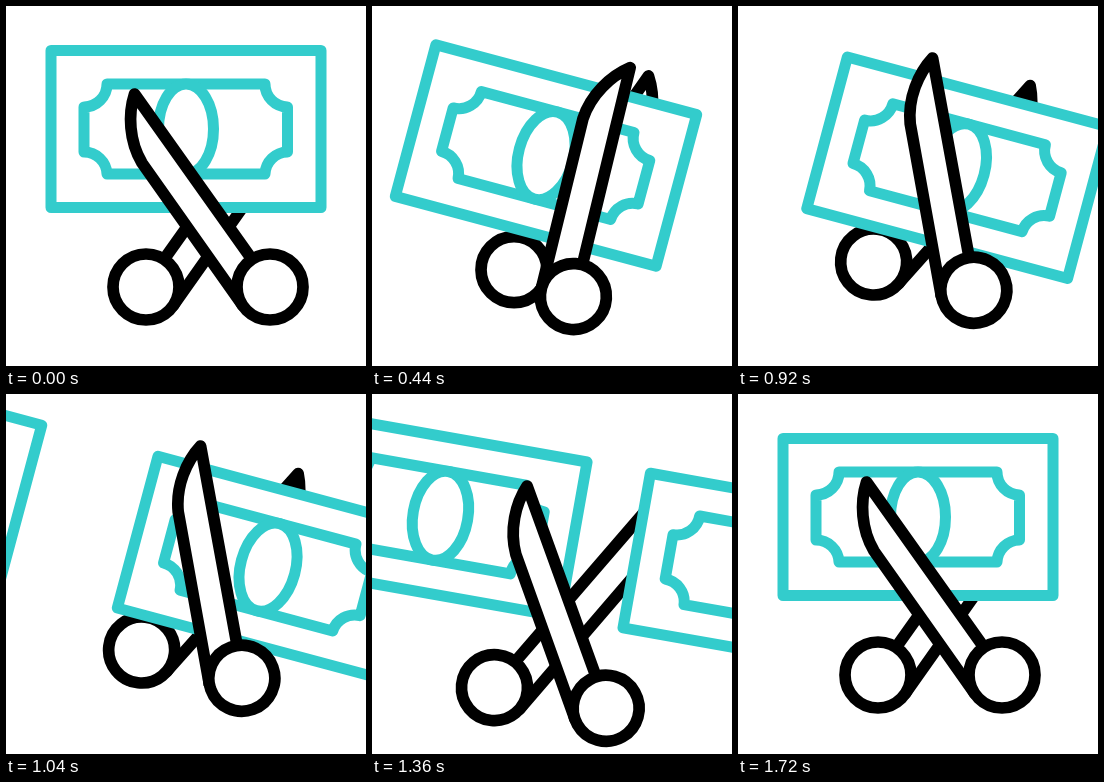
Animation of 360x360 px, one loop 2000 ms. Source, as an HTML page:

```html
<!DOCTYPE html>
<html lang="en">
<head>
<meta charset="utf-8">
<title>Scissors cutting a banknote</title>
<style>
  html, body { margin: 0; width: 100%; height: 100%; overflow: hidden; background: #fff; }
  svg { display: block; width: 100vw; height: 100vh; }
</style>
</head>
<body>
<svg viewBox="0 0 360 360">
  <defs>
    <g id="bill" stroke="#33cccc" stroke-width="11">
      <path d="M45 44.5H315V201.5H45Z"/>
      <path d="M101 78H259A23 23 0 0 0 281.5 101V146A23 23 0 0 0 259 168H101A23 23 0 0 0 78 146V101A23 23 0 0 0 101 78Z"/>
      <ellipse cx="180" cy="123" rx="27.5" ry="45"/>
    </g>
    <g id="blade" stroke="#000" stroke-width="11.7">
      <path d="M245 252L128.5 88C122 108 123 135 136 157L237 300"/>
      <circle cx="264" cy="281" r="33"/>
    </g>
  </defs>
  <g id="scene" fill="#fff" stroke-linejoin="round" stroke-linecap="round">
    <g id="back"><use href="#blade" transform="translate(404 0) scale(-1 1)"/></g>
    <use id="cut" href="#bill"/>
    <use id="next" href="#bill"/>
    <g id="front"><use href="#blade"/></g>
  </g>
</svg>
<script>
  const LOOP = 2000, STEP = 40;
  const HINGE = [202, 224], TURN = [76.2, 113.5];
  const el = id => document.getElementById(id);
  const set = (id, value) => el(id).setAttribute('transform', value);

  // Smooth 0..1 between two moments
  function ease(t, from, to) {
    const x = Math.min(1, Math.max(0, (t - from) / (to - from)));
    return x * x * (3 - 2 * x);
  }

  // Blade angle: snip shut, reopen partly, then open fully
  function swing(t, shut, rest) {
    return shut * ease(t, 160, 440)
      + (rest - shut) * ease(t, 440, 640)
      - rest * ease(t, 1040, 1720);
  }

  function draw(t) {
    const tilt = 15 * (ease(t, 80, 400) - ease(t, 1260, 1520));
    set('scene', `rotate(${tilt} ${TURN})`);

    const push = ease(t, 80, 400);
    const dx = 21.4 * (push - ease(t, 1120, 1540));
    const dy = -53.8 * (push - ease(t, 1120, 1400));
    const pose = angle => `translate(${dx} ${dy}) rotate(${angle} ${HINGE})`;
    set('front', pose(swing(t, 34, 10)));
    set('back', pose(swing(t, -15.3, -8.5)));

    const away = 296 * ease(t, 660, 1690) + 32 * ease(t, 1480, 1720);
    const gap = 366 * (1 - ease(t, 800, 1680));
    set('cut', `translate(${away} 0)`);
    set('next', `translate(${-gap} 0)`);
  }

  function tick() {
    const t = performance.now() % LOOP;
    draw(Math.floor(t / STEP) * STEP);
    requestAnimationFrame(tick);
  }
  tick();
</script>
</body>
</html>
```
